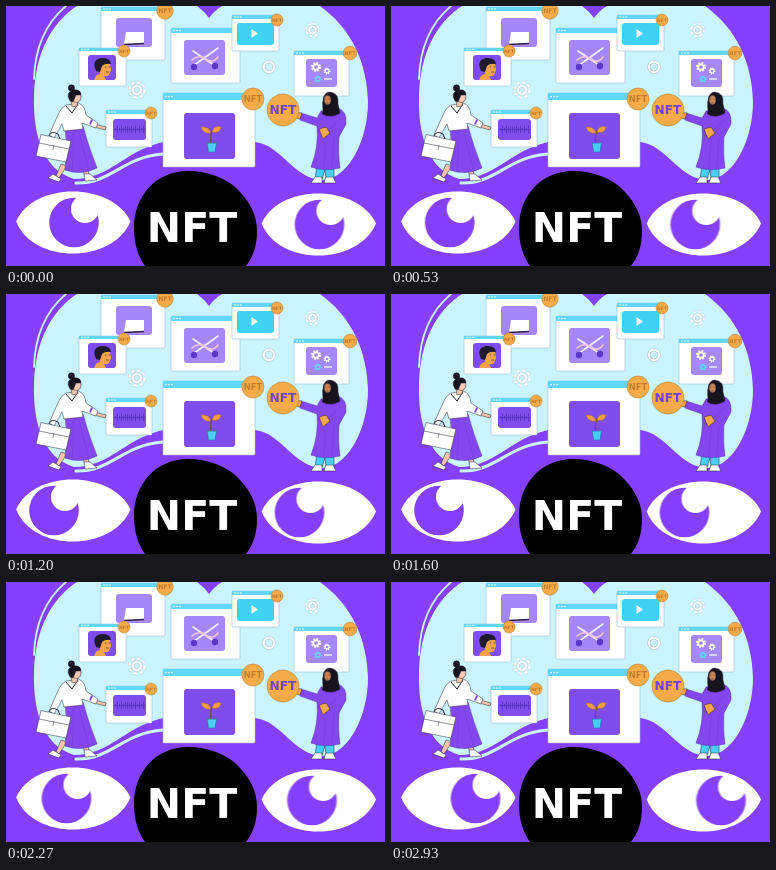
Write an HTML page that moves like this. It is 379 by 260 pixels and loops after 2.99 s.

```html
<!DOCTYPE html>
<html lang="en">
<head>
<meta charset="utf-8">
<title>NFT eyes</title>
<style>
  html, body { margin: 0; width: 100%; height: 100%; overflow: hidden; background: #8540fb; }
  svg { display: block; width: 379px; height: 260px; }
  text { font-family: "DejaVu Sans", "Noto Sans", sans-serif; font-weight: 700; text-anchor: middle; }
  .iris { animation: look 2990ms infinite; }
  /* The loop cuts back hard from the right-hand pose. */
  @keyframes look {
    0% { transform: translateX(0); animation-timing-function: ease-in-out; }
    37% { transform: translateX(-20px); }
    57% { transform: translateX(-20px); animation-timing-function: cubic-bezier(.42, 0, .68, .95); }
    100% { transform: translateX(17px); }
  }
</style>
</head>
<body>
<svg viewBox="0 0 379 260">
  <defs>
    <path id="lid" d="M10.200 215.500C27 175.500 106 175.500 124.500 215.500C106 258.200 27 258.200 10.200 215.500Z"/>
    <clipPath id="lidClip"><use href="#lid"/></clipPath>
    <g id="gear" fill="none">
      <circle r="7.600" stroke="#b4c6da" stroke-width="3.200" stroke-dasharray="3 2.970"/>
      <circle r="7.600" stroke="#fff" stroke-width="2.400" stroke-dasharray="3 2.970"/>
      <circle r="5.400" fill="#fff" stroke="#b4c6da" stroke-width=".5"/>
      <circle r="2.800" fill="#caf4ff" stroke="#b4c6da" stroke-width=".6"/>
    </g>
    <g id="cog" fill="none" stroke="currentColor">
      <circle r="4" stroke-width="2" stroke-dasharray="1.700 1.440"/>
      <circle r="2.700" stroke-width="1.700"/>
    </g>
  </defs>

  <rect width="379" height="260" fill="#8540fb"/>
  <path fill="#caf4ff" d="M71 0C45 17 29 48 28 90C27 128 36 163 68 173C104 173 118 145 157 136H249
    C276 139 288 174 317 174C344 172 362 132 362 96C361 57 346 23 314 0Z"/>
  <path fill="#8540fb" d="M191 0H216Q208 5 203 12Q198 5 191 0Z"/>
  <g fill="none" stroke="#caf4ff" stroke-linecap="round">
    <path stroke-width="1.800" d="M60 0C41 16 29 41 28 73"/>
    <path stroke-width="3" d="M70 177C105 178 116 151 157 148"/>
  </g>

  <use href="#gear" transform="translate(131 84)"/>
  <use href="#gear" transform="translate(306.500 24) scale(.83)"/>
  <g fill="none" stroke="#b4c6da" stroke-width=".7">
    <circle cx="263" cy="61" r="6.500" fill="#fff"/>
    <circle cx="263" cy="61" r="4" fill="#caf4ff"/>
  </g>

  <g id="windows"></g>

  <!-- briefcase -->
  <path fill="#fff" d="M120 26H138V38H118Z"/>
  <path d="M118 38.500L138 37.500" stroke="#2d2545" stroke-width="1.300"/>

  <!-- portrait -->
  <path fill="#f2a64a" d="M88 74Q90 68 94 68L93 60Q97 54 104 58L105 64L103 69Q101 71 98 70L100 74Z"/>
  <path fill="#1e1830" d="M90 65Q85 54 95 52Q104 51 105 58Q99 57 96 60L94 66Z"/>
  <path stroke="#412b30" stroke-width=".7" d="M99 61H100.500M102.500 61H104M100 66H103"/>

  <!-- brush artwork -->
  <g fill="none" stroke-linecap="round">
    <path stroke="#f3f0ff" stroke-width="1.600" d="M187 60L212 42M187 45L208 59"/>
    <path stroke="#efc3dc" stroke-width="1.600" d="M186 54Q193 48 200 53T212 51"/>
  </g>
  <g fill="#5c35c9">
    <circle cx="188" cy="61" r="3.200"/>
    <circle cx="209" cy="60" r="3.200"/>
  </g>
  <path fill="#fff" d="M245.500 23L252 27.500L245.500 32Z"/>

  <g color="#fff">
    <use href="#cog" transform="translate(310 61)"/>
    <use href="#cog" transform="translate(321 65) scale(.7)"/>
    <use href="#cog" transform="translate(312 73) scale(.7)" color="#5adcf5"/>
  </g>
  <path d="M318 73H326" stroke="#fff" stroke-width="1.200"/>

  <path id="wave" fill="none" stroke="#5531b8" stroke-width=".8"/>

  <!-- plant -->
  <path d="M205 138Q204 130 206 124" fill="none" stroke="#705038" stroke-width="1.200"/>
  <path fill="#f0a13d" stroke="#a66b31" stroke-width=".5" d="M205 127Q197 128 195 121Q203 120 205 127ZM206 126Q208 119 215 121Q214 128 206 126Z"/>
  <path fill="#49cdf2" stroke="#286a9b" stroke-width=".6" d="M201 137H210.500L209 146H202.500Z"/>

  <!-- woman with bag -->
  <g stroke="#242038" stroke-width=".5" stroke-linejoin="round">
    <path fill="#f7c6ad" d="M55 158L50 170L53 172L61 160ZM76 161L79 171L83 171L82 160Z"/>
    <path fill="#fff" d="M47 168L55 173L53 176L42 172ZM78 168L84 168L91 174L79 175Z"/>
    <path fill="#8447ed" stroke="#5731ad" d="M59 121L77 120Q82 139 91 162Q75 170 59 164Q62 143 59 121Z"/>
    <path fill="none" stroke="#6a3fd0" d="M67 127Q68 145 66 166M73 127Q78 147 83 164"/>
    <path fill="#f7c6ad" d="M89 118L100 121L99 124L88 121Z"/>
    <path fill="#fff" d="M61 99L72 97Q79 99 80 109L92 117L90 122L76 117L77 123L58 125L56 118L48 132L43 129L52 109Q55 101 61 99Z"/>
    <path fill="none" stroke-width="1" d="M60 100L66 107L72 98"/>
    <path stroke="#8447ed" stroke-width="2" d="M86 113.500L84 118.500"/>
    <path fill="#f7c6ad" d="M65 94L72 95L71 100L66 101Z"/>
    <ellipse cx="70.500" cy="91" rx="4.500" ry="5.500" fill="#f7c6ad"/>
    <path fill="#181421" d="M64 95Q59 87 67 84Q75 83 75 89L70 89L67 96Z"/>
    <circle cx="65.500" cy="82" r="3.200" fill="#181421"/>
    <path fill="none" stroke-width="1" d="M43 130Q45 124 52 128L54 133"/>
    <path fill="#fff" d="M35 128.500L65 135L60 156L30 150Z"/>
    <path fill="none" d="M33 137L63 143M48 139L47 144"/>
  </g>

  <!-- woman with coin -->
  <g stroke="#292040" stroke-width=".5" stroke-linejoin="round">
    <path fill="#49cdf2" d="M311 159H328V173H320L319 164L316 173H309Z"/>
    <path fill="#fff" d="M309 171H316V177H305ZM320 171H327L330 177H318Z"/>
    <path fill="#8447ed" stroke="#5731ad" d="M315 105L332 102Q341 105 340 118L333 131Q332 149 334 162Q318 166 305 161Q313 141 311 120L294 114L295 107L311 112Z"/>
    <path fill="none" stroke="#6a3fd0" d="M335 112L324 123L311 126M321 130Q318 149 318 163M328 132L326 161"/>
    <path fill="#f2a64a" d="M286 106L296 107L294 113L286 111ZM313 123L320 121L324 127L317 133Z"/>
    <path fill="#17131f" d="M317 105Q315 86 324 86Q333 87 332 98L334 107Q326 113 316 108Z"/>
    <ellipse cx="321.500" cy="94" rx="3.500" ry="4.800" fill="#c88552"/>
    <path fill="none" d="M319 93H320.500M322.500 93H324M320 97H322"/>
  </g>

  <g id="coins"></g>

  <path d="M128 222C128 190 150 165 182 165C201 165 222 172 234 186C245 198 251 210 251 225
    C251 240 247 251 240 260H139C132 250 128 238 128 222Z"/>
  <text x="186" y="236" font-size="41" fill="#fff">NFT</text>

  <g id="eyes"></g>
</svg>
<script>
  const byId = id => document.getElementById(id);
  const rect = (x, y, w, h, fill, extra = "") =>
    `<rect x="${x}" y="${y}" width="${w}" height="${h}" fill="${fill}" ${extra}/>`;

  function browser(x, y, w, h, bar, px, py, pw, ph, fill) {
    const dots = [3, 6, 9].map(d =>
      `<circle cx="${x + d}" cy="${y + bar / 2}" r=".8" fill="#fff"/>`).join("");
    return rect(x, y, w, h, "#fff", 'rx="1" stroke="#9db9d2" stroke-width=".6"') +
      rect(x, y, w, bar, "#62d6fb") + dots +
      rect(px, py, pw, ph, fill, 'rx="3"');
  }

  function coin(x, y, r, ink = "#c27d2c") {
    return `<circle cx="${x}" cy="${y}" r="${r}" fill="#f4ab48" stroke="#bd8037" stroke-width=".6"/>
      <text x="${x}" y="${y + r * .28}" font-size="${r * .76}" fill="${ink}">NFT</text>`;
  }

  // Each eye holds its own moving iris, so both run on the same clock.
  function eye(x, y) {
    return `<g transform="translate(${x} ${y})">
      <use href="#lid" fill="#fff"/>
      <g clip-path="url(#lidClip)"><g class="iris">
        <circle cx="68" cy="216.5" r="24.8" fill="#8540fb"/>
        <circle cx="79" cy="203" r="14" fill="#fff"/>
      </g></g>
    </g>`;
  }

  const violet = "#7f4dec", lavender = "#a587f7";
  byId("windows").innerHTML = [
    [95, 1, 64, 53, 4, 110, 12, 36, 29, lavender],
    [73, 42, 47, 38, 3, 82, 49, 28, 25, violet],
    [165, 22, 69, 55, 5, 178, 34, 41, 35, lavender],
    [226, 9, 47, 36, 4, 231, 17, 37, 22, "#3fd2f5"],
    [288, 45, 55, 45, 4, 300, 53, 31, 28, lavender],
    [100, 104, 46, 37, 4, 107, 113, 33, 21, violet],
    [157, 87, 92, 74, 7, 178, 107, 51, 46, violet]
  ].map(w => browser(...w)).join("");

  byId("coins").innerHTML = [
    [159, 5, 8.2], [118, 45, 6], [271, 14, 6], [344, 47, 6.8],
    [145, 107, 6], [247, 93, 11], [277, 104, 16, "#7442d2"]
  ].map(c => coin(...c)).join("");

  byId("eyes").innerHTML = eye(0, 0) + eye(245.5, 2);

  byId("wave").setAttribute("d", Array.from({ length: 15 }, (_, i) => {
    const h = 1 + 3 * Math.abs(Math.sin(i * 1.7));
    return `M${109.5 + i * 2} ${123.5 - h}v${2 * h}`;
  }).join("") + "M108 123.5H139");
</script>
</body>
</html>
```
